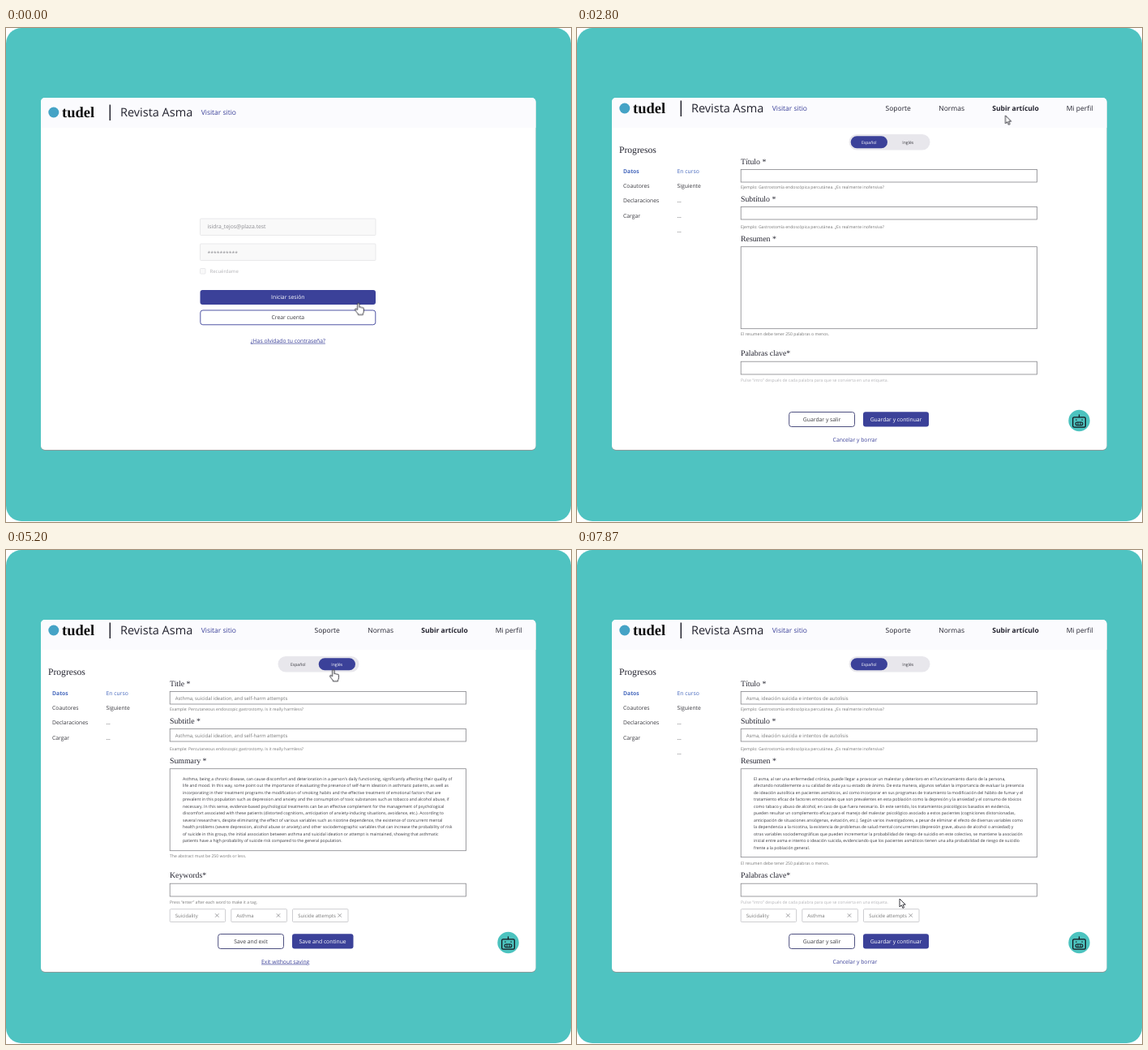
Write an HTML page that moves like this. It is 697 px wide and 609 px high and loops after 8 s.

```html
<!DOCTYPE html>
<html lang="es">
<head>
<meta charset="utf-8">
<title>Revista Asma</title>
<style>
html, body { margin: 0; width: 100%; height: 100%; overflow: hidden; background: #fff; }
svg { display: block; width: 697px; height: 609px; }
text {
  font: 6.8px "Open Sans", "Noto Sans", sans-serif;
  fill: #3a3a40; text-rendering: geometricPrecision; white-space: pre;
}
.nav text, .link { font-size: 8.5px; fill: #22222e; }
.small text, .small { font-size: 6px; }
.tiny text, .tiny { font-size: 5.1px; }
.serif text, .serif { font-family: "Liberation Serif", "Noto Serif", serif; fill: #23232f; }
.label text { font-size: 9.8px; }
.mid text, .mid { text-anchor: middle; }
.grey text, .grey { fill: #777; }
.pale { fill: #b4b4b8; }
.blue { fill: #3b4199; }
.white { fill: #fff; }
.bold { font-weight: 700; }
.field { fill: #fff; stroke: #85858a; stroke-width: .8; }
.tag { fill: #fff; stroke: #b9b9be; stroke-width: .7; }
.soft { fill: #f9f9f9; stroke: #e4e4e6; stroke-width: .8; }
.outline { fill: #fff; stroke: #3b4199; stroke-width: .9; }
.card { fill: #fbfbfe; stroke: #85858f; stroke-width: .8; }
.ink { fill: none; stroke: #15151d; stroke-width: 1.4; stroke-linecap: round; stroke-linejoin: round; }

/* one shared 8 s clock */
.a { animation: 8s cubic-bezier(.215,.61,.355,1) infinite; }
.login { animation-name: login; }
.dash { animation-name: dash; }
.form { animation-name: form; }
.head { animation-name: head; }
.es { animation-name: es; }
.en { animation-name: en; }
.fill { animation-name: fill; }
.tags { animation-name: tags; }
.area { animation-name: area; }
.cap { animation-name: cap; }
.save { animation-name: save; }
.cursor { animation-name: move; animation-timing-function: ease-in-out; }
.hand { animation-name: hand; animation-timing-function: step-end; }
.arrow { animation-name: arrow; animation-timing-function: step-end; }

@keyframes login { 0%, .5% { opacity: 1 } 5.5%, 100% { opacity: 0 } }
@keyframes dash { 0%, .5% { opacity: 0 } 5.5%, 25.87% { opacity: 1 } 25.875%, 100% { opacity: 0 } }
@keyframes form { 0%, 25.87% { opacity: 0 } 25.875%, 100% { opacity: 1 } }
@keyframes head { 0%, 25.87% { transform: none } 25.875%, 100% { transform: translateY(-5px) } }
@keyframes es { 0%, 58.6% { opacity: 1 } 62.4%, 82.25% { opacity: 0 } 86%, 100% { opacity: 1 } }
@keyframes en { 0%, 58.6% { opacity: 0 } 62.4%, 82.25% { opacity: 1 } 86%, 100% { opacity: 0 } }
@keyframes fill {
  0%, 35.375% { opacity: 0 } 39.125%, 58.6% { opacity: 1 }
  62.4%, 82.25% { opacity: 0 } 86%, 100% { opacity: 1 }
}
@keyframes tags { 0%, 35.375% { opacity: 0 } 39.125%, 100% { opacity: 1 } }
@keyframes area {
  0%, 35.375% { height: 101px } 39.125%, 58.6% { height: 109px }
  62.4%, 82.25% { height: 101px } 86%, 100% { height: 109px }
}
@keyframes cap {
  0%, 35.375% { transform: none } 39.125%, 58.6% { transform: translateY(8.5px) }
  62.4%, 82.25% { transform: none } 86%, 100% { transform: translateY(8.5px) }
}
@keyframes save { 0%, 58.6% { width: 81px } 62.4%, 82.25% { width: 75.5px } 86%, 100% { width: 81px } }
@keyframes move {
  0%, 10.4% { transform: translate(434.7px, 339.5px) }
  16.6%, 17.9% { transform: translate(527px, 126px) }
  19.1%, 20.4% { transform: translate(528px, 112px) }
  21.6%, 23.6% { transform: translate(530px, 108.5px) }
  24.1%, 25.87% { transform: translate(531.5px, 108.5px) }
  25.875%, 39.5% { transform: translate(528.5px, 107.8px) }
  45%, 45.2% { transform: translate(403.8px, 149.5px) }
  45.8%, 74.6% { transform: translate(403.8px, 147.8px) }
  76.6%, 85.1% { transform: translate(377.5px, 143.2px) }
  89.1%, 91.9% { transform: translate(363px, 301px) }
  98.3%, 100% { transform: translate(398px, 430px) }
}
@keyframes hand { 0% { opacity: 1 } 4.1% { opacity: 0 } 44% { opacity: 1 } 86.6%, 100% { opacity: 0 } }
@keyframes arrow { 0% { opacity: 0 } 4.1% { opacity: 1 } 44% { opacity: 0 } 86.6%, 100% { opacity: 1 } }
</style>
</head>
<body>
<svg viewBox="0 0 697 609" xmlns="http://www.w3.org/2000/svg">
<defs>
  <g id="bot">
    <circle r="13.2" fill="#4cc3bf"/>
    <g class="ink" style="stroke-width:1.3">
      <rect x="-7.8" y="-4.2" width="15.6" height="12.4" rx="1.6"/>
      <path d="M0-4.4V-7.2M-3.6-1v.2M3.6-1v.2"/>
      <rect x="-4.4" y="2" width="8.8" height="3.8" rx="1.7" style="stroke-width:1.1"/>
      <path d="M-1.5 2.2v3.4M1.5 2.2v3.4" style="stroke-width:.9"/>
    </g>
  </g>
  <g id="dots" fill="#22222e"><circle cy="306" r="1"/><circle cy="309.2" r="1"/><circle cy="312.4" r="1"/></g>
  <path id="x" d="M-2.2-2.2l4.4 4.4m0-4.4l-4.4 4.4" fill="none" stroke="#77777c" stroke-width=".7"/>
  <g id="title" class="serif">
    <text y="360.4" style="font-size:8.4px">Asma, ideación suicida e intentos</text>
    <text y="370.4" style="font-size:8.4px">de autolisis</text>
  </g>
  <g id="paper">
    <text class="blue bold" y="329.6">RCNP-2024-15-R1</text>
    <text class="small" y="346.4">Isidra Tejos</text>
    <use href="#title"/>
  </g>
</defs>

<rect width="697" height="608" rx="19" fill="#4fc3c1"/>
<rect x="43" y="87" width="610.5" height="434" rx="5" fill="#8c9c9c"/>
<rect x="43" y="86" width="610.5" height="434" rx="5" fill="#fff"/>
<path d="M43 123V91a5 5 0 0 1 5-5h600.500a5 5 0 0 1 5 5v32z" fill="#fbfbfe"/>

<g class="a head">
  <circle cx="58.800" cy="104" r="6.500" fill="#45a3c6"/>
  <text class="serif bold" x="69" y="109.800" style="font-size:18.5px;fill:#111">tudel</text>
  <path d="M128.300 94.500V114" stroke="#22222e" stroke-width="1.500"/>
  <text x="141" y="109.200" style="font-size:14.5px;fill:#22222e">Revista Asma</text>
  <text class="link" x="240.700" y="107.200" style="fill:#3b4199">Visitar sitio</text>
</g>

<g class="a login">
  <rect class="soft" x="239.500" y="235" width="216.500" height="20.500" rx="1"/>
  <rect class="soft" x="239.500" y="266" width="216.500" height="20.500" rx="1"/>
  <rect class="soft" x="239.500" y="296.500" width="6.500" height="6.500" rx=".8"/>
  <text x="248.500" y="247.300" style="fill:#8d8d92">isidra_tejos@plaza.test</text>
  <text x="248.500" y="279.500" style="fill:#8d8d92">**********</text>
  <text class="small pale" x="251.500" y="302">Recuérdame</text>
  <rect class="blue" x="239.500" y="323" width="216.500" height="18" rx="3"/>
  <rect class="outline" x="239.800" y="348" width="216" height="17.800" rx="3"/>
  <g class="mid">
    <text class="white" x="347.800" y="334.300">Iniciar sesión</text>
    <text x="347.800" y="359.300">Crear cuenta</text>
    <text class="blue" x="347.800" y="387.700" text-decoration="underline">¿Has olvidado tu contraseña?</text>
  </g>
</g>

<g class="a dash">
  <g class="nav">
    <text x="382" y="107.200">Soporte</text>
    <text x="448" y="107.200">Normas</text>
    <text x="514" y="107.200">Subir artículo</text>
    <text class="bold" x="601" y="107.200">Mi perfil</text>
  </g>
  <rect x="200.500" y="168.500" width="294.500" height="42.500" rx="2.500" fill="#e8e7ec"/>
  <circle cx="347.800" cy="162" r="16" fill="#fff"/>
  <g class="ink" style="stroke-width:1.7">
    <path d="M355.500 153v-3.200h-17.300v20.400q0 2.600 2.600 2.600h12.200q2.500 0 2.500-2.600v-2.400"/>
    <path d="M342 154.700h9.500M342 158.700h7.500M342 162.700h5.500" style="stroke-width:1.4"/>
    <path d="M350 167.200l1-3.600 7.700-8.600 2.400 2.200-7.700 8.600z" fill="#fff"/>
  </g>
  <text class="serif mid" x="347.600" y="195.800" style="font-size:9.5px">Hola, Isidra Tejos Montalba</text>
  <g class="serif mid" style="--n:20px">
    <text x="206" y="237.800" style="font-size:20px">3</text>
    <text x="268" y="237.800" style="font-size:20px">1</text>
    <text x="331.500" y="237.800" style="font-size:20px">1</text>
    <text x="397.500" y="237.800" style="font-size:20px">0</text>
    <text x="458.500" y="237.800" style="font-size:20px">1</text>
  </g>
  <g class="grey">
    <text x="200.300" y="250.900">enviados</text>
    <text x="263.800" y="250.900">con cambios</text>
    <text x="327.300" y="250.900">revisión</text>
    <text x="390.700" y="250.900">completados</text>
    <text x="454.200" y="250.900">rechazados</text>
  </g>
  <rect class="blue" x="200.500" y="256.700" width="41" height="2"/>
  <rect class="card" x="125.500" y="289.500" width="140.300" height="95.500" rx="3"/>
  <rect class="card" x="275.500" y="289.500" width="144.700" height="95.500" rx="3"/>
  <rect class="card" x="429.800" y="289.500" width="140.300" height="95.500" rx="3"/>
  <rect x="138.500" y="304" width="27" height="11" rx="1.200" fill="#4f79ca"/>
  <rect x="288.500" y="304" width="33" height="11" rx="1.200" fill="#e02a2c"/>
  <rect x="443" y="304" width="27.500" height="11" rx="1.200" fill="#e3802c"/>
  <g class="tiny mid">
    <text class="white" x="152" y="311.300">Revisión</text>
    <text class="white" x="305" y="311.300">Rechazado</text>
    <text class="white" x="456.800" y="311.300">Cambios</text>
  </g>
  <use href="#dots" x="246"/><use href="#dots" x="402"/><use href="#dots" x="551"/>
  <use href="#paper" x="138.500"/><use href="#paper" x="288.500"/><use href="#paper" x="443"/>
  <use href="#bot" x="618" y="489"/>
</g>

<g class="a form">
  <g class="nav">
    <text x="380.500" y="102.200">Soporte</text>
    <text x="446.300" y="102.200">Normas</text>
    <text class="bold" x="512.300" y="102.200">Subir artículo</text>
    <text x="603.800" y="102.200">Mi perfil</text>
  </g>
  <text class="serif" x="52" y="153.800" style="font-size:11.6px">Progresos</text>
  <text class="bold" x="57" y="178.900" style="fill:#4668bd">Datos</text>
  <text x="57" y="197.200">Coautores</text>
  <text x="57" y="215.400">Declaraciones</text>
  <text x="57" y="233.600">Cargar</text>
  <text x="123.500" y="178.900" style="fill:#4668bd">En curso</text>
  <text x="123.500" y="197.200">Siguiente</text>
  <text x="123.500" y="215.400">...</text>
  <text x="123.500" y="233.600">...</text>

  <rect x="335.500" y="131" width="100" height="19.500" rx="9.750" fill="#e8e7ec"/>
  <rect class="field" x="202.200" y="174.500" width="365.200" height="15.500"/>
  <rect class="field" x="202.200" y="220.500" width="365.200" height="15.500"/>
  <rect class="field a area" x="202.200" y="269.700" width="365.200" height="101"/>
  <rect class="field" x="202.200" y="411.200" width="365.200" height="15.800"/>
  <rect x="261.700" y="473.500" width="80.800" height="18" rx="3" fill="#fff" stroke="#3a3d72" stroke-width=".9"/>
  <rect class="blue a save" x="353" y="473.300" width="81" height="18.200" rx="3"/>

  <g class="a tags small">
    <rect class="tag" x="202.200" y="442.700" width="68.400" height="15.800" rx="1"/>
    <rect class="tag" x="277.800" y="442.700" width="68.700" height="15.800" rx="1"/>
    <rect class="tag" x="353.500" y="442.700" width="68.500" height="15.800" rx="1"/>
    <text class="grey" x="208.700" y="452.700">Suicidality</text>
    <text class="grey" x="284.300" y="452.700">Asthma</text>
    <text class="grey" x="360.200" y="452.700">Suicide attempts</text>
    <use href="#x" x="260.300" y="450.500"/><use href="#x" x="336" y="450.500"/><use href="#x" x="411.700" y="450.500"/>
  </g>

  <g class="a es">
    <text x="123.500" y="252">...</text>
    <rect class="blue" x="337.700" y="133.200" width="45.300" height="15" rx="7.500"/>
    <g class="tiny mid">
      <text class="white" x="360.300" y="142.600">Español</text>
      <text x="408.300" y="142.600" font-weight="500">Inglés</text>
    </g>
    <g class="serif label">
      <text x="202" y="168">Título *</text>
      <text x="202" y="213.800">Subtítulo *</text>
      <text x="202" y="263">Resumen *</text>
      <text x="202" y="404.200">Palabras clave*</text>
    </g>
    <g class="tiny grey">
      <text x="202" y="197.600">Ejemplo: Gastrostomía endoscópica percutánea. ¿Es realmente inofensiva?</text>
      <text x="202" y="246.800">Ejemplo: Gastrostomía endoscópica percutánea. ¿Es realmente inofensiva?</text>
      <text class="a cap" x="202" y="379.300">El resumen debe tener 250 palabras o menos.</text>
      <text x="202" y="435.900" style="fill:#b4b4b8">Pulse “intro” después de cada palabra para que se convierta en una etiqueta.</text>
    </g>
    <g class="mid">
      <text x="302.100" y="484.500">Guardar y salir</text>
      <text class="white" x="393.500" y="484.500">Guardar y continuar</text>
      <text class="blue" x="343" y="509.600">Cancelar y borrar</text>
    </g>
  </g>

  <g class="a fill">
    <g class="small grey">
      <text x="208.700" y="184.600">Asma, ideación suicida e intentos de autolisis</text>
      <text x="208.700" y="230.600">Asma, ideación suicida e intentos de autolisis</text>
    </g>
    <text class="tiny" y="275.300"><tspan x="218" dy="8.5">El asma, al ser una enfermedad crónica, puede llegar a provocar un malestar y deterioro en el funcionamiento diario de la persona,</tspan><tspan x="218" dy="8.5">afectando notablemente a su calidad de vida ya su estado de ánimo. De esta manera, algunos señalan la importancia de evaluar la presencia</tspan><tspan x="218" dy="8.5">de ideación autolítica en pacientes asmáticos, así como incorporar en sus programas de tratamiento la modificación del hábito de fumar y el</tspan><tspan x="218" dy="8.5">tratamiento eficaz de factores emocionales que son prevalentes en esta población como la depresión y la ansiedad y el consumo de tóxicos</tspan><tspan x="218" dy="8.5">como tabaco y abuso de alcohol, en caso de que fuera necesario. En este sentido, los tratamientos psicológicos basados en evidencia,</tspan><tspan x="218" dy="8.5">pueden resultar un complemento eficaz para el manejo del malestar psicológico asociado a estos pacientes (cogniciones distorsionadas,</tspan><tspan x="218" dy="8.5">anticipación de situaciones ansiógenas, evitación, etc.). Según varios investigadores, a pesar de eliminar el efecto de diversas variables como</tspan><tspan x="218" dy="8.5">la dependencia a la nicotina, la existencia de problemas de salud mental concurrentes (depresión grave, abuso de alcohol o ansiedad) y</tspan><tspan x="218" dy="8.5">otras variables sociodemográficas que pueden incrementar la probabilidad de riesgo de suicidio en este colectivo, se mantiene la asociación</tspan><tspan x="218" dy="8.5">inicial entre asma e intento o ideación suicida, evidenciando que los pacientes asmáticos tienen una alta probabilidad de riesgo de suicidio</tspan><tspan x="218" dy="8.5">frente a la población general.</tspan></text>
  </g>

  <g class="a en">
    <rect class="blue" x="385.700" y="133.200" width="45.300" height="15" rx="7.500"/>
    <g class="tiny mid">
      <text x="360.300" y="142.600" font-weight="500">Español</text>
      <text class="white" x="408.300" y="142.600">Inglés</text>
    </g>
    <g class="serif label">
      <text x="202" y="168">Title *</text>
      <text x="202" y="213.800">Subtitle *</text>
      <text x="202" y="263">Summary *</text>
      <text x="202" y="404.200">Keywords*</text>
    </g>
    <g class="tiny grey">
      <text x="202" y="197.600">Example: Percutaneous endoscopic gastrostomy. Is it really harmless?</text>
      <text x="202" y="246.800">Example: Percutaneous endoscopic gastrostomy. Is it really harmless?</text>
      <text x="202" y="379.300">The abstract must be 250 words or less.</text>
      <text x="202" y="435.900">Press “enter” after each word to make it a tag.</text>
    </g>
    <g class="small grey">
      <text x="208.700" y="184.600">Asthma, suicidal ideation, and self-harm attempts</text>
      <text x="208.700" y="230.600">Asthma, suicidal ideation, and self-harm attempts</text>
    </g>
    <text class="tiny" y="275.300"><tspan x="218" dy="8.5">Asthma, being a chronic disease, can cause discomfort and deterioration in a person's daily functioning, significantly affecting their quality of</tspan><tspan x="218" dy="8.5">life and mood. In this way, some point out the importance of evaluating the presence of self-harm ideation in asthmatic patients, as well as</tspan><tspan x="218" dy="8.5">incorporating in their treatment programs the modification of smoking habits and the effective treatment of emotional factors that are</tspan><tspan x="218" dy="8.5">prevalent in this population such as depression and anxiety and the consumption of toxic substances such as tobacco and alcohol abuse, if</tspan><tspan x="218" dy="8.5">necessary. In this sense, evidence-based psychological treatments can be an effective complement for the management of psychological</tspan><tspan x="218" dy="8.5">discomfort associated with these patients (distorted cognitions, anticipation of anxiety-inducing situations, avoidance, etc.). According to</tspan><tspan x="218" dy="8.5">several researchers, despite eliminating the effect of various variables such as nicotine dependence, the existence of concurrent mental</tspan><tspan x="218" dy="8.5">health problems (severe depression, alcohol abuse or anxiety) and other sociodemographic variables that can increase the probability of risk</tspan><tspan x="218" dy="8.5">of suicide in this group, the initial association between asthma and suicidal ideation or attempt is maintained, showing that asthmatic</tspan><tspan x="218" dy="8.5">patients have a high probability of suicide risk compared to the general population.</tspan></text>
    <g class="mid">
      <text x="302.100" y="484.500">Save and exit</text>
      <text class="white" x="390.600" y="484.500">Save and continue</text>
      <text class="blue" x="344.700" y="509.600" text-decoration="underline">Exit without saving</text>
    </g>
  </g>
  <use href="#bot" x="619.500" y="484"/>
</g>

<g class="a cursor" fill="#fff" stroke="#22222a" stroke-width=".9" stroke-linejoin="round">
  <path class="a arrow" d="M0 0V10l2.300-2.200 1.600 3.600 1.700-.7-1.600-3.500H7.200z"/>
  <path class="a hand" d="M-1.200 8V.9a1.200 1.200 0 0 1 2.400 0V5a1.100 1.100 0 0 1 2 .3a1.100 1.100 0 0 1 1.900 .4a1 1 0 0 1 1.500 .8V9.500q0 2-1 3V14H-.4V13Q-2.600 10.600-4.200 8q-.2-1.500 1.100-1.400z"/>
</g>
</svg>
</body>
</html>
```
